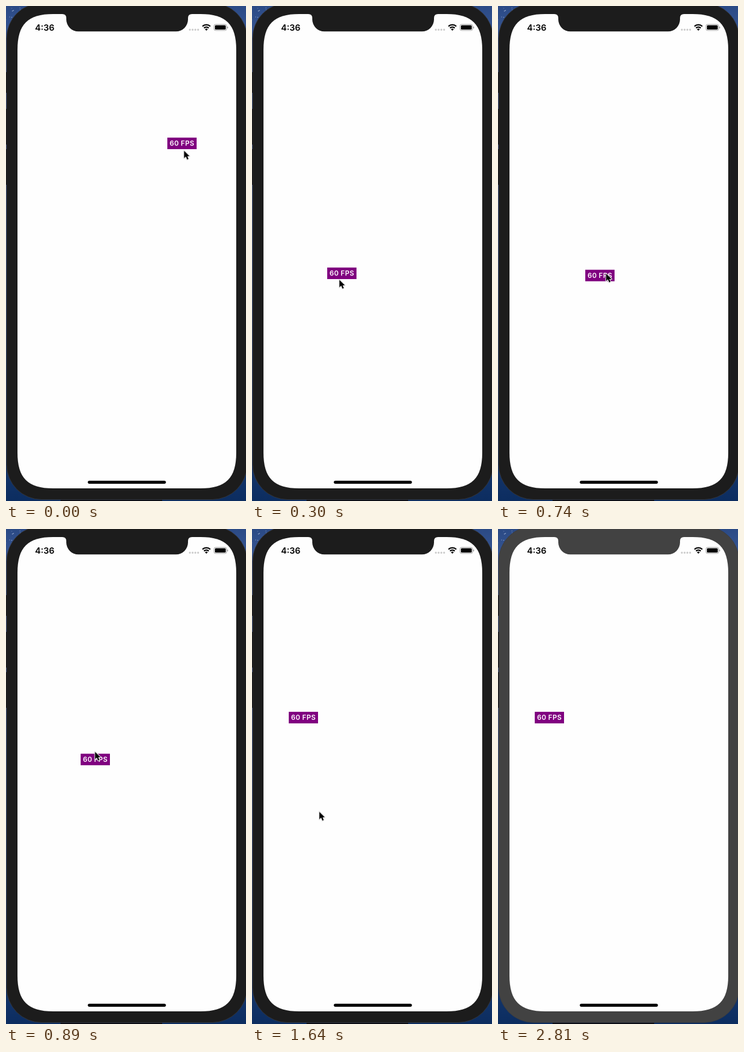
Recreate the animation shown at these times as an HTML page. Size 418 px wide and 861 px high, loop 2910 ms.

```html
<!DOCTYPE html>
<html lang="en">
<head>
<meta charset="utf-8">
<title>FPS label</title>
<style>
  html, body { margin: 0; width: 100%; height: 100%; overflow: hidden; background: #1c1c1c; }
  svg { display: block; width: 418px; height: 861px; }
  text { font-family: Inter, Roboto, sans-serif; font-weight: 600; text-anchor: middle; }
  #label text { font-size: 11.9px; letter-spacing: .35px; fill: #fff; }
  #cursor path { stroke: #fff; stroke-width: 2; stroke-linejoin: round; paint-order: stroke; }
  #cursor { filter: drop-shadow(0 .7px .7px rgba(0, 0, 0, .45)); }
</style>
</head>
<body>
<svg viewBox="0 0 418 861">
  <defs>
    <linearGradient id="sky" x1="0" y1="0" x2="0" y2="1">
      <stop offset="0" stop-color="#2b4a85"/>
      <stop offset=".15" stop-color="#4a6aad"/>
      <stop offset=".5" stop-color="#4868a8"/>
      <stop offset="1" stop-color="#0c2d60"/>
    </linearGradient>
  </defs>

  <!-- desktop -->
  <rect width="418" height="861" fill="url(#sky)"/>
  <g id="stars" fill="#b9c8e6"></g>
  <rect x="95" y="859" width="177" height="2" fill="#0b0d14"/>

  <!-- phone -->
  <rect id="bezel" x="1" y="-5" width="419" height="863.5" rx="61" fill="#1c1c1c" stroke="#3a3c40" stroke-width=".8"/>
  <path d="M.7 115v36m0 28v62m0 8v62" stroke="#1a1a1c" stroke-width="1.5"/>
  <path id="screen" fill="#fefefe"/>
  <path fill="#1c1c1c" id="notch" d="M98 13V14Q105 14 105 21V23.3A21 21 0 0 0 126 44.3H296A21 21 0 0 0 317 23.3V21Q317 14 324 14V13Z"/>
  <rect x="142.5" y="825.8" width="136" height="5.1" rx="2.55"/>

  <!-- status bar -->
  <text x="67.5" y="43" font-size="15">4:36</text>
  <path d="M320.2 41.2h14.5" stroke="#cbcbcb" stroke-width="3.4" stroke-linecap="round" stroke-dasharray="0 4.8"/>
  <g fill="none" stroke="#000" stroke-width="2.3">
    <path d="M342.2 35.4A9.8 9.8 0 0 1 355.8 35.4"/>
    <path d="M344.9 38.3A5.9 5.9 0 0 1 353.1 38.3"/>
  </g>
  <path d="M349 43L346.6 40.5A3.4 3.4 0 0 1 351.4 40.5Z"/>
  <rect x="362.3" y="32" width="22" height="10.6" rx="2.8" fill="none" stroke="#9b9b9b"/>
  <rect x="363.9" y="33.6" width="18.8" height="7.4" rx="1.5"/>
  <path d="M385.4 35.6q1.6 .5 1.6 1.8t-1.6 1.8z" fill="#9b9b9b"/>

  <g id="label">
    <rect width="51" height="20.3" fill="#800080"/>
    <text x="25.6" y="14.6">60 FPS</text>
  </g>
  <g id="cursor">
    <path d="M1.3 1.4V14.5L4.4 11.6L6.6 16.8L9 15.8L6.9 10.9H10.9Z"/>
  </g>
</svg>
<script>
  const LOOP = 2910, SHOT = 148.4;
  const $ = id => document.getElementById(id);

  // Screen outline with continuous corners: reach along the edge, pull of the handles.
  function outline(l, t, r, b, reach, pull) {
    const corner = (x, y, sx, sy, flip) => {
      const side = d => `${x} ${y + sy * d}`, end = d => `${x + sx * d} ${y}`;
      const [a, z] = flip ? [end, side] : [side, end];
      return `${a(reach)}C${a(pull)} ${z(pull)} ${z(reach)}`;
    };
    return `M${corner(l, t, 1, 1)}L${corner(r, t, -1, 1, true)}` +
           `L${corner(r, b, -1, -1)}L${corner(l, b, 1, -1, true)}Z`;
  }
  $('screen').setAttribute('d', outline(20, 14, 401, 839, 62, 18));

  let seed = 7;
  const rand = () => (seed = seed * 16807 % 2147483647) / 2147483647;
  for (let i = 0; i < 14; i++) {
    const star = document.createElementNS('http://www.w3.org/2000/svg', 'circle');
    const place = { cx: 30 * rand(), cy: 26 * rand(), r: .3 + .5 * rand() };
    for (const k in place) star.setAttribute(k, place[k]);
    $('stars').append(star);
  }

  // The picture is refreshed once per shot, on a 10 ms clock.
  const shotTime = i => 10 * Math.round((SHOT * i + 2.8) / 10);

  // Each pose holds until the next one.
  function hold(id, poses) {
    const frames = poses.map(([time, style]) => ({ ...style, offset: time / LOOP, easing: 'steps(1, end)' }));
    frames.push({ ...frames.at(-1), offset: 1 });
    $(id).animate(frames, { duration: LOOP, iterations: Infinity });
  }
  const at = (shot, [x, y]) => [shotTime(shot), { transform: `translate(${x}px, ${y}px)` }];

  const drag = [
    [281, 228.7], [234.7, 349.3], [131, 454.7], [108.6, 456],
    [105, 431.8], [152, 458.5], [130, 390.6], [64, 317.8]
  ];
  const grip = [32.5, 9.5], LEAD = .2;

  // The pointer runs ahead of the label in proportion to its speed, and rests at the end.
  const pointer = drag.map((p, i) => {
    const prev = drag[i - 1] || p, next = drag[i + 1] || prev;
    return p.map((v, k) => v + grip[k] + LEAD * (next[k] - prev[k]) / 2);
  });
  const leave = [[116, 490.5], [265.8, 856.5], [266, 900]];

  hold('label', drag.map((p, i) => at(i, p)));
  hold('cursor', [
    ...pointer.map((p, i) => at(i, p)),
    ...leave.map((p, i) => at(11 + i, p))
  ]);
  for (const id of ['bezel', 'notch']) hold(id, [[0, { fill: '#1c1c1c' }], [2810, { fill: '#424242' }]]);
</script>
</body>
</html>
```
